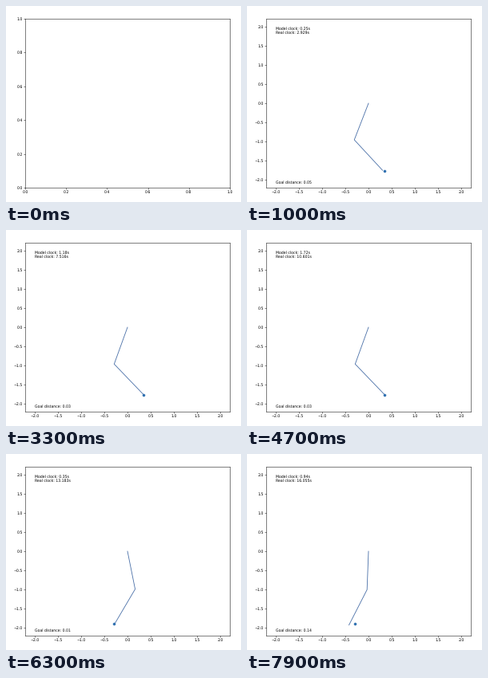
Write a matplotlib script that moves like this. It is 294 px wide and 246 px high and loops after 8000 ms.

```python
import numpy as np
import matplotlib.pyplot as plt
from matplotlib.animation import FuncAnimation

W, H = 294, 246
LEFT, RIGHT, TOP, BOTTOM = 24.1, 279.9, 16.1, 228.1
FRAMES, STEP = 80, 100
RESET = 55          # second episode begins here

plt.rcParams.update({
    "font.family": "DejaVu Sans", "font.size": 4.58, "text.hinting": "none",
    "axes.linewidth": 0.5,
    "xtick.major.width": 0.5, "ytick.major.width": 0.5,
    "xtick.major.size": 1.6, "ytick.major.size": 1.6,
    "xtick.major.pad": 1.6, "ytick.major.pad": 1.6,
})

fig = plt.figure(figsize=(W / 72, H / 72), dpi=72, facecolor="white")
ax = fig.add_axes([LEFT / W, 1 - BOTTOM / H, (RIGHT - LEFT) / W, (BOTTOM - TOP) / H])
arm, = ax.plot([], [], color="#4a70a8", lw=0.85)
goal, = ax.plot([], [], "o", color="#2f70b0", ms=3.1, mew=0.46)
model_text, real_text, dist_text = (ax.text(-2, y, "") for y in (1.92, 1.81, -2.09))


def settle(s, target, decay, freq):
    """Damped swing from rest to a target angle."""
    return target * (1 - np.exp(-decay * s) * np.cos(freq * s))


def reach_right(s):
    return settle(s, -0.291, 0.3, 0.35), settle(s, 0.671, 0.3, 0.13)


def reach_left(s):
    upper = 0.27 * np.exp(-0.052 * s) * np.sin(np.pi * s / 21.2)
    return upper, settle(s + 1.2, -0.41, 0.1, 0.2)


def clock(steps, values):
    """Quadratic through three readings."""
    return np.poly1d(np.polyfit(steps, values, 2))


# start step, goal, pose rule, model clock, real clock
FIRST, SECOND = (10, 33, 47), (57, 69, 79)
EPISODES = [
    (1, (0.35, -1.77), reach_right,
     clock(FIRST, (0.25, 1.18, 1.72)), clock(FIRST, (2.929, 7.516, 10.601))),
    (RESET, (-0.285, -1.89), reach_left,
     clock(SECOND, (0.2, 0.54, 0.94)), clock(SECOND, (12.611, 14.03, 16.055))),
]


def set_axes(lo, hi, ticks):
    names = [f"{t:.1f}".replace("-", "\u2212") for t in ticks]
    ax.set(xlim=(lo, hi), ylim=(lo, hi), xticks=ticks, yticks=ticks,
           xticklabels=names, yticklabels=names)


def draw(i):
    parts = (arm, goal, model_text, real_text, dist_text)
    for p in parts:
        p.set_visible(i > 0)
    if i == 0:
        set_axes(0, 1, np.linspace(0, 1, 6))
        return parts
    set_axes(-2.2, 2.2, np.linspace(-2, 2, 9))

    start, (gx, gy), pose, model, real = EPISODES[i >= RESET]
    a, b = pose(i - start)
    x = np.cumsum([0, np.sin(a), np.sin(b)])
    y = np.cumsum([0, -np.cos(a), -np.cos(b)])
    arm.set_data(x, y)
    goal.set_data([gx], [gy])

    dist = float(np.hypot(x[2] - gx, y[2] - gy))
    model_text.set_text(f"Model clock: {round(max(0.01, float(model(i))), 2)}s")
    real_text.set_text(f"Real clock: {round(float(real(i)), 3)}s")
    dist_text.set_text(f"Goal distance: {round(dist, 2)}")
    return parts


anim = FuncAnimation(fig, draw, frames=FRAMES, init_func=lambda: draw(0),
                     interval=STEP, repeat=True, repeat_delay=0, blit=False)
plt.show()
```
